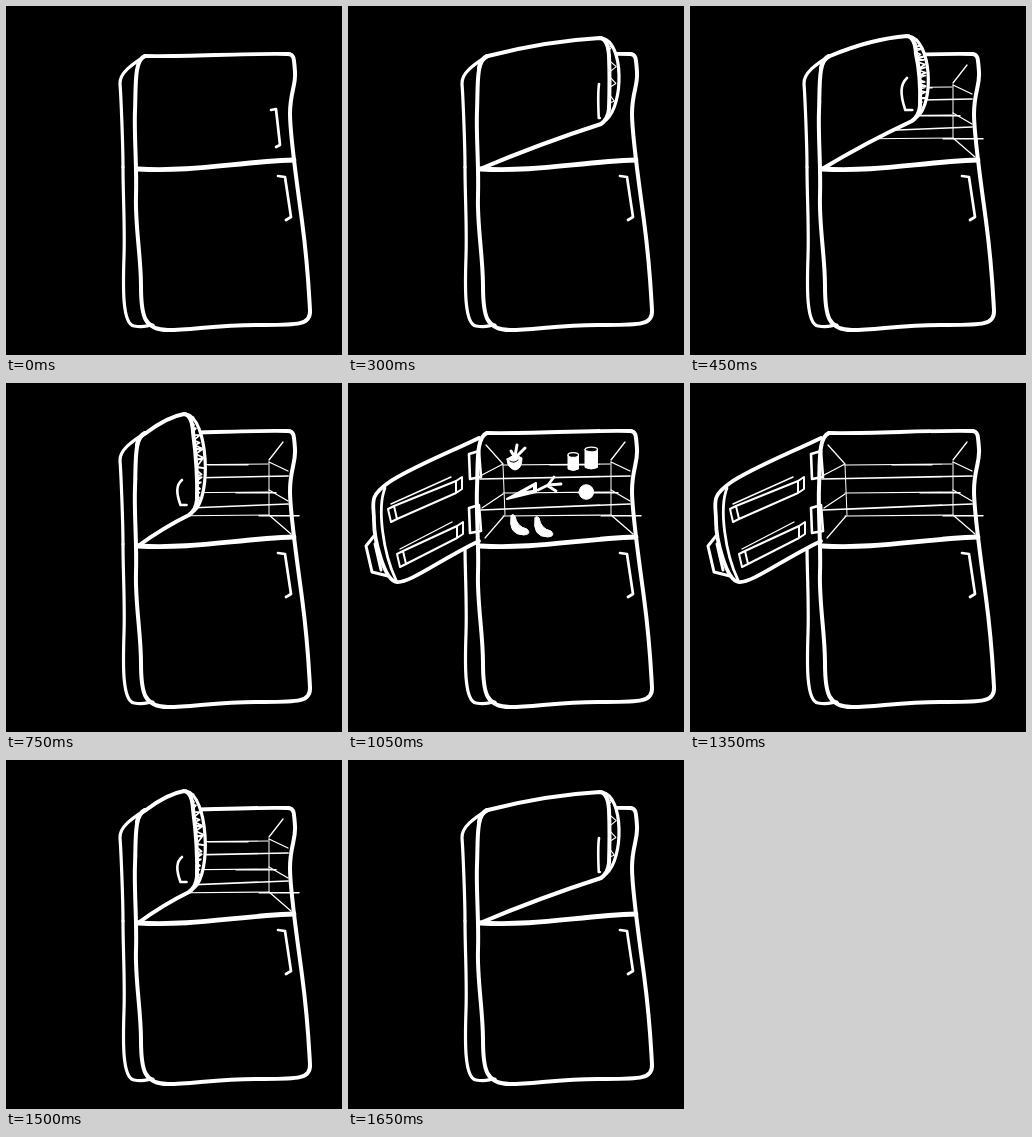
These frames come from a looping animation (336 by 349 pixels, 1800 ms). An HTML page:

```html
<!DOCTYPE html>
<html lang="en">
<head>
<meta charset="utf-8">
<title>Fridge</title>
<style>
  html, body { margin: 0; width: 100%; height: 100%; overflow: hidden; background: #000; }
  svg { display: block; width: 100vw; height: 100vh; }
</style>
</head>
<body>
<svg id="stage" viewBox="0 0 336 349" fill="none" stroke="#fff" stroke-linecap="round" stroke-linejoin="round"></svg>
<script>
const NS = 'http://www.w3.org/2000/svg';
const stage = document.getElementById('stage');
const BEAT = 150;
const [CLOSED, AJAR, HALF, NARROW, WIDE, FULL] = [0, 1, 2, 3, 4, 5];
const BEATS = [CLOSED, CLOSED, AJAR, HALF, HALF, NARROW, WIDE, FULL, FULL, WIDE, NARROW, AJAR];
const parts = [];

// A part is a group visible from one pose to another.
function part(first, last, draw) {
  const g = document.createElementNS(NS, 'g');
  stage.append(g);
  draw(g);
  parts.push({ g, first, last });
}

function path(g, d, width, fill = 'none') {
  const p = document.createElementNS(NS, 'path');
  p.setAttribute('d', d);
  p.setAttribute('stroke-width', width);
  p.setAttribute('fill', fill);
  g.append(p);
  return p;
}

let seed = 7;
const random = () => (seed = seed * 16807 % 2147483647) / 2147483647;

// Zigzag inside the rim; the door drawn later hides its inner ends.
function scribble(g, rim, strokes, width) {
  const length = rim.getTotalLength();
  let d = '';
  for (let i = 0; i <= strokes; i++) {
    const { x, y } = rim.getPointAtLength(length * (0.08 + 0.86 * i / strokes));
    const inset = i % 2 ? 1 + 3 * random() : 8 + 5 * random();
    d += `${i ? 'L' : 'M'}${x - inset} ${y + 6 * random() - 3}`;
  }
  path(g, d, width);
}

// Door hinged on the left; (tx, ty) is its free top corner, (lx, ly) the lower one.
function swungDoor(pose, [tx, ty], [lx, ly], strokes, ink, [hx, hy, hook, height]) {
  part(pose, pose, g => {
    const rim = path(g, `M${tx + 2} ${ty}C${tx + 24} ${ty + 4} ${lx + 15} ${ly - 4} ${lx - 3} ${ly + 11}`, 3.2, '#000');
    scribble(g, rim, strokes, ink);
    path(g, `M131 62Q132 54 140 50Q${72 + tx / 2} ${ty + 3} ${tx} ${ty}
      Q${tx + 8} ${ty + 1} ${tx + 9} ${ty + 18}Q${lx + 1} ${ly - 30} ${lx} ${ly}
      Q${lx - 1} ${ly + 10} ${lx - 8} ${ly + 15}Q${62 + lx / 2} ${86 + ly / 2} 132 163`, 4, '#000');
    path(g, `M${hx} ${hy}c${-hook} ${height * 0.2} ${-hook} ${height * 0.5} ${-hook / 4} ${height}h${hook}`, 2.6);
  });
}

// Top edge and side
part(CLOSED, FULL, g => {
  path(g, 'M139 50C180 51 240 47 282 48', 3.8);
  path(g, 'M117 161C117 190 119 220 118 250S116 318 128 320S140 319 147 319', 3.2);
});
part(CLOSED, NARROW, g => path(g, 'M139 50C130 56 113 66 114 78S117 140 117 161', 3.2));

// Interior
part(HALF, FULL, g => {
  for (const y of [82, 110, 133]) {
    path(g, `M155 ${y}L262 ${y - 1}`, 1.1);
    path(g, `M${y + 120} ${y - 0.3}h40`, 1.5);
  }
  path(g, 'M132 96L282 93M133 127L282 121', 1.7);
  path(g, 'M155 82L157 132M263 79V132', 1);
  path(g, 'M138 62L155 81L134 92M155 111L134 125M156 133L137 155', 1.2);
  path(g, 'M277 59L263 77M263 79L282 88M263 107L282 118M263 132L285 151', 1.3);
});

swungDoor(AJAR, [252, 32], [261, 103], 9, 1.1, [251, 78, 1, 34]);
swungDoor(HALF, [217, 30], [230, 100], 40, 1.7, [217, 72, 7, 32]);
swungDoor(NARROW, [178, 31], [191, 117], 34, 1.7, [176, 97, 6, 25]);

function tray(g, x, y, w) {
  path(g, `M${x} ${y}l6 -3l3 13l-6 3zm6 -3l${w} -25l6 -4v12l-6 4v-12m0 12L${x + 9} ${y + 10}`, 2);
  path(g, `M${x + 3} ${y - 5}l${w - 2} -27`, 1.4);
}

part(WIDE, FULL, g => {
  path(g, 'M26 153L18 163L24 189L40 193M27 161L33 187', 3);
  path(g, 'M131 55C100 70 60 86 40 100S26 120 26 138S36 198 49 199S90 178 131 158', 3.8, '#000');
  path(g, 'M37 105C29 125 35 170 48 197', 2.8);
  tray(g, 40, 126, 62);
  tray(g, 49, 171, 54);
});

// Food
function can(g, x, y, w, h) {
  const lid = `a${w / 2} 2.4 0 1 0 ${w} 0a${w / 2} 2.4 0 1 0 ${-w} 0z`;
  path(g, `M${x} ${y}v${h}q${w / 2} 3 ${w} 0v${-h}z`, 1, '#fff');
  path(g, `M${x} ${y}${lid}`, 1.3, '#000');
}

function banana(g, x, y) {
  path(g, `M${x} ${y}q-3 19 13 19q8 -1 3 -6q-10 -2 -12 -13q-3 -3 -4 0z`, 1, '#fff');
}

part(FULL, FULL, g => {
  path(g, 'M159 76q8 -6 15 -1q0 11 -7 12q-8 -2 -8 -11z', 1, '#fff');
  path(g, 'M167 73L169 62M169 73L177 65M166 73L163 68', 3);
  path(g, 'M162 78q4 3 8 -1', 1).setAttribute('stroke', '#000');
  can(g, 220, 72, 10.5, 14);
  can(g, 237, 66.5, 12.5, 18);
  path(g, 'M159 116L188 100V109z', 2, '#fff');
  path(g, 'M178 108L185 104V107z', 0, '#000');
  path(g, 'M190 107L200 102L206 94M200 102L213 101M200 103L208 108', 2.8);
  path(g, 'M231 109a7.3 7.3 0 1 0 14.6 0a7.3 7.3 0 1 0 -14.6 0z', 1, '#fff');
  banana(g, 163, 133);
  banana(g, 187, 135);
});

// Front frame, lower handle and hinges
part(CLOSED, FULL, g => {
  path(g, `M139 50C128 54 130 80 129 105S131 160 130 190S135 250 135 280S138 324 162 324
    S210 319 250 319S305 320 304 304S302 260 296 215S284 130 284 108S290 80 289 66S288 48 282 48`, 4);
  path(g, 'M132 163C190 166 230 156 288 154', 4.8);
  path(g, 'M272 170L279 171L285 211L280 214', 2.7);
});
part(CLOSED, CLOSED, g => path(g, 'M265 104L270 103L274 139L270 141', 2.7));
part(WIDE, FULL, g => {
  for (const y of [68, 122]) path(g, `M121 ${y + 3}L131 ${y}L133 ${y + 26}L122 ${y + 28}z`, 2.6);
});

function tick() {
  const pose = BEATS[Math.floor(performance.now() / BEAT) % BEATS.length];
  for (const { g, first, last } of parts) {
    g.style.display = pose >= first && pose <= last ? '' : 'none';
  }
  requestAnimationFrame(tick);
}
tick();
</script>
</body>
</html>
```
